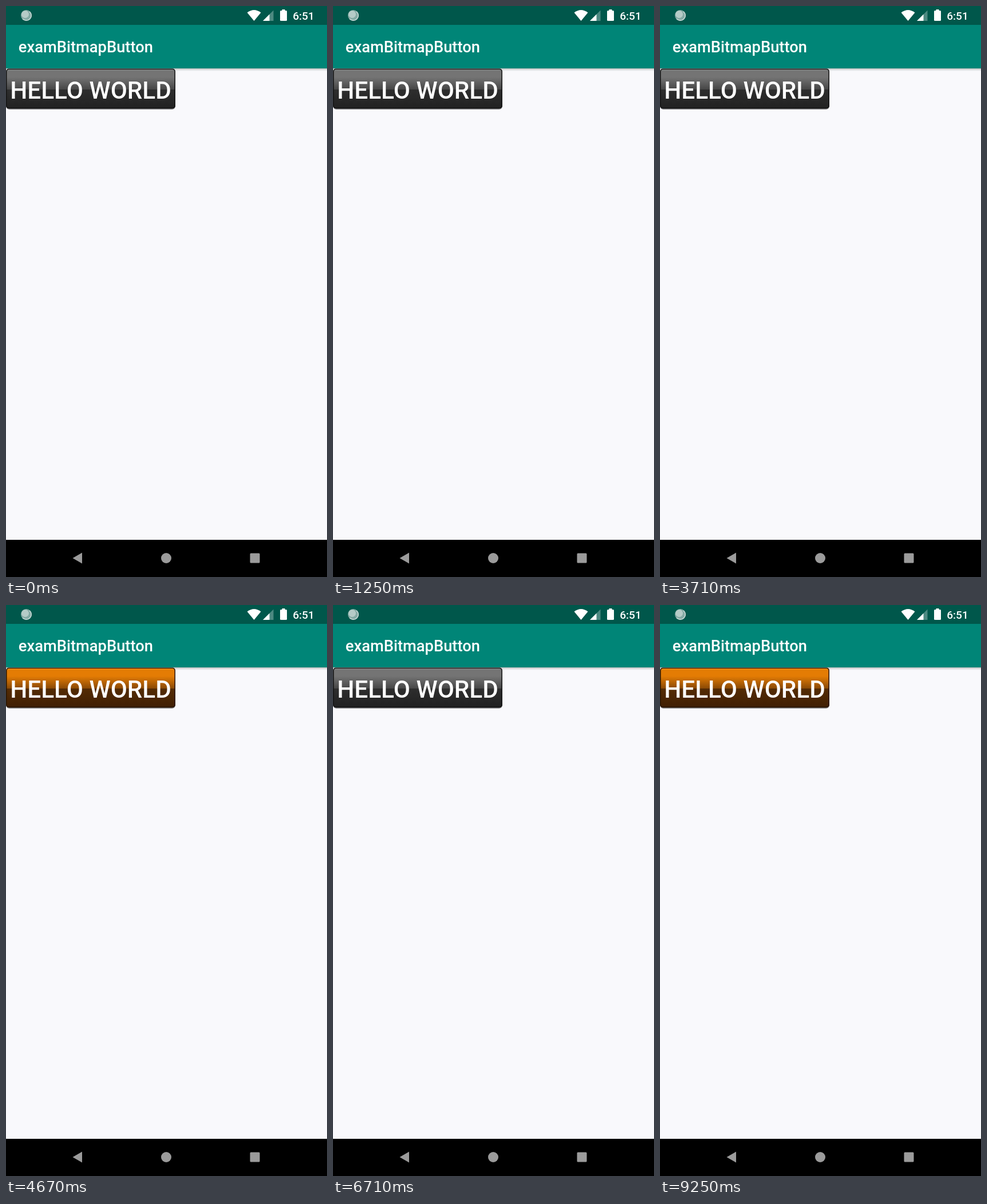
Recreate the animation shown at these times as an HTML page with a canvas. Size 561 by 998 pixels, loop 9.29 s.

```html
<!DOCTYPE html>
<html lang="en">
<head>
<meta charset="utf-8">
<title>Bitmap button</title>
<style>
  html, body { margin: 0; width: 100%; height: 100%; overflow: hidden; background: #f9f9fc; }
  canvas { display: block; width: 561px; height: 998px; }
</style>
</head>
<body>
<canvas id="stage" width="561" height="998"></canvas>
<script>
const ctx = document.getElementById('stage').getContext('2d');
const W = 561, H = 998, LOOP = 9290;

// Each press is [down, up) in ms.
const PRESSES = [[1880, 3500], [4290, 6000], [6790, LOOP]];

const IDLE = { top: '#747474', middle: '#474747', lower: '#2e2e2e', bottom: '#222222', edge: '#151515', shine: '#858585' };
const PRESSED = { top: '#e47c04', middle: '#8b4a05', lower: '#552c04', bottom: '#412003', edge: '#2b1602', shine: '#f08c14' };

function rect(x, y, w, h, fill) {
  ctx.fillStyle = fill;
  ctx.fillRect(x, y, w, h);
}

function rounded(x, y, w, h, r, fill) {
  ctx.beginPath();
  ctx.roundRect(x, y, w, h, r);
  ctx.fillStyle = fill;
  ctx.fill();
}

function disc(x, y, r, fill) {
  ctx.beginPath();
  ctx.arc(x, y, r, 0, Math.PI * 2);
  ctx.fillStyle = fill;
  ctx.fill();
}

function polygon(fill, ...points) {
  ctx.beginPath();
  points.forEach(([x, y]) => ctx.lineTo(x, y));
  ctx.closePath();
  ctx.fillStyle = fill;
  ctx.fill();
}

function vertical(y0, y1, ...stops) {
  const gradient = ctx.createLinearGradient(0, y0, 0, y1);
  stops.forEach(([at, color]) => gradient.addColorStop(at, color));
  return gradient;
}

function text(value, x, y, size, align = 'left') {
  ctx.font = `500 ${size}px Roboto, sans-serif`;
  ctx.textAlign = align;
  ctx.fillStyle = '#fff';
  ctx.fillText(value, x, y);
}

function drawStatusBar() {
  rect(0, 0, W, 33, '#00574b');

  disc(35.5, 16.5, 9.5, '#84aaa4');
  disc(33.5, 14.5, 6.5, '#b5cbc7');
  ctx.beginPath();
  ctx.arc(35.5, 16.5, 8.7, -0.9, 2.4);
  ctx.strokeStyle = '#d3dfdd';
  ctx.lineWidth = 1.4;
  ctx.stroke();

  // Wi-Fi fan
  ctx.beginPath();
  ctx.moveTo(433.5, 26);
  ctx.lineTo(421.5, 11.5);
  ctx.quadraticCurveTo(433.5, 2.5, 445.5, 11.5);
  ctx.closePath();
  ctx.fillStyle = '#fff';
  ctx.fill();

  // Mobile signal
  polygon('#4d8981', [449, 26], [467.5, 26], [467.5, 7.5]);
  polygon('#fff', [449, 26], [460.5, 26], [460.5, 14.5]);

  rounded(479, 8, 12, 18, 1.5, '#fff');
  rect(482.5, 6, 5, 3, '#fff');
  text('6:51', 520, 23.5, 19.1, 'center');
}

function drawAppBar() {
  rect(0, 33, W, 76, '#008577');
  rect(0, 109, W, 5, vertical(109, 114, [0, '#b2b4b4'], [0.35, '#d9dadb'], [1, '#f9f9fc']));
  text('examBitmapButton', 21.8, 81, 27.3);
}

function drawButton(skin) {
  rounded(0, 111, 296, 70, 6, 'rgba(0,0,0,.4)');
  rounded(0, 109.5, 296, 70, 5, skin.edge);
  rounded(1.5, 111, 293, 66.5, 4, vertical(111, 177.5,
    [0, skin.shine], [0.04, skin.top], [0.2, skin.top], [0.52, skin.middle],
    [0.52, skin.lower], [1, skin.bottom]));
  text('HELLO WORLD', 148, 162, 42.3, 'center');
}

function drawNavigation() {
  const icon = '#9b9b9b';
  rect(0, 933, W, H - 933, '#000');
  polygon(icon, [116.5, 965], [133, 955.5], [133, 974.5]);
  disc(280, 965, 9, icon);
  rounded(426.5, 956.5, 17, 17, 1.5, icon);
}

function frame(now) {
  const t = now % LOOP;
  const pressed = PRESSES.some(([down, up]) => t >= down && t < up);
  rect(0, 0, W, H, '#f9f9fc');
  drawStatusBar();
  drawAppBar();
  drawButton(pressed ? PRESSED : IDLE);
  drawNavigation();
  requestAnimationFrame(animate);
}

let start;
function animate(now) {
  start ??= now;
  frame(now - start);
}
requestAnimationFrame(animate);
</script>
</body>
</html>
```
